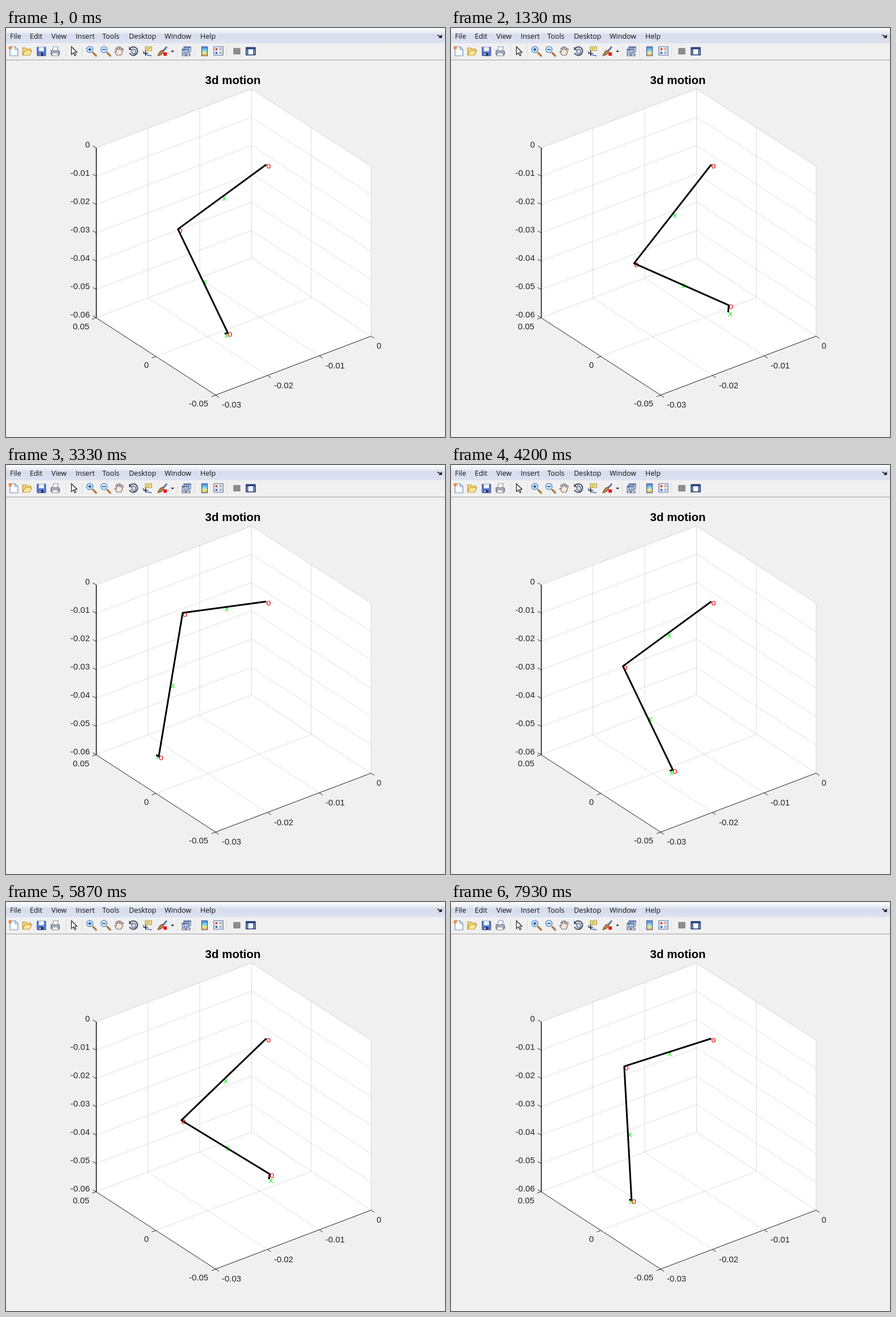
These frames come from a looping animation (775x722 px, 8 s). An HTML page:

```html
<!DOCTYPE html>
<html lang="en">
<head>
<meta charset="utf-8">
<title>3d motion</title>
<style>
  html, body { margin: 0; width: 100%; height: 100%; overflow: hidden; background: #f0f0f0; }
  svg { display: block; }
  .menu { font: 12.5px "Open Sans", sans-serif; fill: #111; }
  .axes text { font: 15px "Liberation Sans", Arial, sans-serif; fill: #262626; }
  .axes .title { font-size: 20.5px; font-weight: bold; fill: #000; }
  .marks { font: 14.5px "Liberation Sans", Arial, sans-serif; }
</style>
</head>
<body>
<svg width="775" height="722" viewBox="0 0 775 722">
  <defs>
    <linearGradient id="bar" x2="0" y2="1">
      <stop offset="0" stop-color="#fdfdfe"/><stop offset=".3" stop-color="#e8ecf5"/>
      <stop offset=".45" stop-color="#d6dcec"/><stop offset="1" stop-color="#dde3f2"/>
    </linearGradient>
    <linearGradient id="rainbow" x2="0" y2="1">
      <stop offset="0" stop-color="#4a78d8"/><stop offset=".4" stop-color="#7fd6e8"/>
      <stop offset=".7" stop-color="#f3ec8a"/><stop offset="1" stop-color="#f0a040"/>
    </linearGradient>
    <g id="lens">
      <path d="M4 4l5 5" stroke="#b5763a" stroke-width="3.4" stroke-linecap="round"/>
      <circle r="5.5" cx="-2" cy="-2" fill="#dff1fc" stroke="#5b93cc" stroke-width="1.5"/>
      <path d="M-5-2h6" stroke="#1c4fa8" stroke-width="1.8"/>
    </g>
  </defs>
  <rect width="775" height="722" fill="#f0f0f0"/>
  <rect width="775" height="27" fill="url(#bar)"/>
  <path d="M0 27.5h775" stroke="#f0f0f0"/>
  <path d="M0 56.5h775" stroke="#a2a2a2"/>
  <path d="M105.500 31v20M134.500 31v20M302.500 31v20M332.500 31v20M389.500 31v20" stroke="#dcdcdc"/>
  <g class="menu" id="menu"></g>
  <path d="M762 12q2 3 5 3" fill="none" stroke="#111" stroke-width="1.6"/>
  <path d="M769.500 11.500v6h-6z" fill="#111"/>

  <g fill="none" stroke-width="1.2">
    <path d="M7 33h9l5 5v11H7z" fill="#fbfdff" stroke="#6c91bd"/>
    <path d="M16 33v5h5" stroke="#6c91bd"/>
    <circle cx="7.500" cy="35" r="3" fill="#f08a3c"/>
    <path d="M29.500 48V35h5l2 2h7v4" fill="#f5d67a" stroke="#bd9133"/>
    <path d="M29.500 48l4-8h12l-4 8z" fill="#ffe89a" stroke="#bd9133"/>
    <path d="M55 34h15v15H56l-1-1z" fill="#5b7fd6" stroke="#3c4f9c"/>
    <path d="M58 34h9v7h-9z" fill="#eef4ff"/><path d="M58 44h8v5h-8z" fill="#2c3768"/>
    <path d="M59 45h2v3h-2z" fill="#fff"/>
    <path d="M82 40l2-7h8l-1 7" fill="#fff" stroke="#8292a8"/>
    <path d="M79.500 40h14l1 2v5h-15z" fill="#aab2bd" stroke="#606978"/>
    <path d="M82 44h9l2 5H81z" fill="#fff" stroke="#7a8390"/>
    <path d="M115.500 33v14l3.500-3 2.500 5 2-1-2.300-5h4.300z" fill="#fff" stroke="#222"/>
    <use href="#lens" x="150" y="40"/><path d="M148 35v6" stroke="#1c4fa8" stroke-width="1.8"/>
    <use href="#lens" x="175" y="40"/>
    <path d="M196 48l-4-6q0-2 3 0l-1-6q1-2 2 0l1 3v-5q2-2 3 0v5l1-5q2-1 2 1v5l2-4q2 0 2 1l-2 7-2 4z" fill="#fce8d4" stroke="#6d6a78"/>
    <path d="M219 36a7.500 7.500 0 1 1-1 8" stroke="#4d5870" stroke-width="2.200"/>
    <path d="M217 33v6h6z" fill="#4d5870"/>
    <path d="M222 39l3-2 4 2v5l-3 2-4-2z" fill="#cfdcf0" stroke="#4d5870"/>
    <path d="M246 33h11v7h-11z" fill="#fff3a0" stroke="#a58b32"/>
    <path d="M248 35.500h7M248 38h5" stroke="#a58b32"/>
    <path d="M242 41q3 7 15 8" stroke="#3f63bd" stroke-width="1.5"/><path d="M242 44.500h9M246.500 40v9" stroke="#111"/>
    <path d="M284 33l-7 8" stroke="#5878ab" stroke-width="3"/>
    <path d="M278 39l-4 1q-4 3-6 9 7-1 10-6z" fill="#b98150" stroke="#7d5431"/>
    <path d="M278 43h6v6h-6z" fill="#f01818"/>
    <path d="M291 40h6l-3 3z" fill="#222"/>
    <path d="M314 33h12v9h-12zM311 37h12v7h-12z" fill="#e6effb" stroke="#4c6999"/>
    <path d="M314 34.500h12M311 38.500h12" stroke="#4c6999" stroke-width="2"/>
    <path d="M311 46h7v3h-7zM317 46h8v3h-8z" stroke="#41597f"/>
    <path d="M345.500 33h10v16h-10z" fill="url(#rainbow)" stroke="#3b568f"/>
    <path d="M367 33h16v15h-16z" fill="#fff" stroke="#45629c"/>
    <path d="M369.500 35.500h4v4h-4z" fill="#e04838"/><path d="M369.500 42h4v4h-4z" fill="#4a6fdc"/>
    <path d="M376 36h5M376 38.500h5M376 42.500h5M376 45h5" stroke="#566"/>
    <path d="M402 36h11v10h-11z" fill="#8d8d8d" stroke="#777"/>
    <path d="M424 34.500h16v13h-16z" fill="#fff" stroke="#1f3768" stroke-width="1.500"/>
    <path d="M424 36h16" stroke="#27437c" stroke-width="3"/>
    <path d="M424 38h3v9h-3zM437 38h3v9h-3z" fill="#7f9cd0" stroke="#27437c"/>
  </g>

  <g class="axes">
    <path d="M159 211.500L433.500 108 644.500 244V544L370 648 159 511.500z" fill="#fff"/>
    <path id="grid" fill="none" stroke="#262626" stroke-opacity=".15"/>
    <path d="M159 511.500L433.500 406 644.500 544M433.500 406V108" fill="none" stroke="#262626" stroke-opacity=".17"/>
    <path id="ticks" d="M159 511.500L370 648 644.500 544" fill="none" stroke="#262626"/>
    <path d="M159.500 211.500v300" stroke="#1a1a1a" stroke-width="1.600"/>
    <text class="title" x="400.500" y="99" text-anchor="middle">3d motion</text>
    <g id="labels" text-anchor="middle"></g>
  </g>
  <g class="marks" id="marks"></g>
  <polyline id="leg" fill="none" stroke="#000" stroke-width="3" stroke-linejoin="round"/>
</svg>
<script>
const $ = id => document.getElementById(id);

function addText(parent, text, x, y, attrs = {}) {
  const el = document.createElementNS("http://www.w3.org/2000/svg", "text");
  el.textContent = text;
  for (const [name, value] of Object.entries({ x, y, ...attrs })) el.setAttribute(name, value);
  return parent.appendChild(el);
}

const MENU = { File: 7, Edit: 42, View: 80, Insert: 123, Tools: 170, Desktop: 217, Window: 280, Help: 343 };
for (const [name, x] of Object.entries(MENU)) addText($("menu"), name, x, 18.5);

// Axes box: u runs along x, v along y, w down the z axis, each from 0 to 1.
const project = (u, v, w) => [370 + 274.5 * u - 211 * v, 348 - 104 * u - 136.500 * v + 300 * w];
const line = (...points) => "M" + points.map(p => project(...p)).join("L");
let grid = "", ticks = $("ticks").getAttribute("d");
const tick = (point, dx, dy) => {
  const [x, y] = project(...point);
  ticks += `M${x} ${y}l${dx} ${dy}`;
};
for (let i = 0; i <= 6; i++) {
  if (i < 6) grid += line([0, 1, i / 6], [1, 1, i / 6], [1, 0, i / 6]);
  tick([0, 1, i / 6], -6, -3.5);
  addText($("labels"), i ? "-0.0" + i : "0", 148, 211 + 50 * i, { "text-anchor": "end" });
}
for (let i = 0; i <= 3; i++) {
  if (i < 3) grid += line([i / 3, 1, 0], [i / 3, 1, 1], [i / 3, 0, 1]);
  tick([i / 3, 0, 1], 6, 4);
}
for (let i = 0; i <= 2; i++) {
  if (i < 2) grid += line([1, i / 2, 0], [1, i / 2, 1], [0, i / 2, 1]);
  tick([0, i / 2, 1], -7, 2.7);
}
$("grid").setAttribute("d", grid);
$("ticks").setAttribute("d", ticks);
for (const [text, x, y] of [["0.05", 132.5, 532], ["0", 248, 600], ["-0.05", 340, 668],
  ["-0.03", 398, 670], ["-0.02", 490, 636], ["-0.01", 581, 601], ["0", 658.5, 566]])
  addText($("labels"), text, x, y);

// One stride, in steps: [step, thigh angle, shank angle] and [step, toe dx, toe dy].
const STRIDE = 63, STEP_MS = 8000 / 120;
const ANGLES = [[0, 7.1, 25.2], [2, 14.6, 31], [7, 34.5, 43.8], [13, 43, 48.8], [15, 41.9, 49.7],
  [20, 29.9, 54], [26, 14.8, 46.8], [28, 9.3, 41], [36, -16.1, 10.3], [39, -19.6, -1],
  [41, -21, -6.5], [46, -22.5, -13.5], [52, -18, -8], [54, -15.5, -2], [56, -12.1, 3.6]];
const FOOT = [[0, -5.5, 2], [7, -4, 8], [15, -2, 12], [20, -1, 12.5], [28, -2, 6],
  [36, -4, -3], [46, -5, -4], [56, -4.5, 0]];

// Smooth periodic curve through the keys.
function sample(keys, step) {
  const n = keys.length;
  const key = (i, c) => keys[(i + n) % n][c] + (c ? 0 : STRIDE * Math.floor(i / n));
  let i = n - 1;
  while (keys[i][0] > step) i--;
  const gap = j => key(j + 1, 0) - key(j, 0);
  const h = gap(i), s = (step - key(i, 0)) / h;
  return [1, 2].map(c => {
    const rate = j => (key(j + 1, c) - key(j, c)) / gap(j);
    const slope = j => (rate(j - 1) * gap(j) + rate(j) * gap(j - 1)) / (gap(j - 1) + gap(j));
    const a = key(i, c), b = key(i + 1, c);
    return a + (b - a) * s * s * (3 - 2 * s)
      + h * s * (1 - s) * (slope(i) * (1 - s) - slope(i + 1) * s);
  });
}

const HIP = [459.5, 241];
const add = ([x, y], dx, dy) => [x + dx, y + dy];
const middle = (a, b) => [(a[0] + b[0]) / 2, (a[1] + b[1]) / 2];

// Each limb turns in a tilted plane, so its end follows an ellipse on screen.
function pose(step) {
  const [thigh, shank] = sample(ANGLES, step).map(a => a * Math.PI / 180);
  const knee = add(HIP, -157.2 * Math.cos(thigh), 91.2 * Math.cos(thigh) + 191.1 * Math.sin(thigh));
  const ankle = add(knee, 206.5 * Math.sin(shank), 241.5 * Math.cos(shank) - 84 * Math.sin(shank));
  return [HIP, knee, ankle, add(ankle, ...sample(FOOT, step))];
}

const marks = [..."oooxxx"].map(c => addText($("marks"), c, 0, 0, { fill: c === "o" ? "#f00" : "#0f0" }));

function draw(now) {
  const step = Math.floor((now % 8000 + 3.5) / STEP_MS) % STRIDE;
  const [hip, knee, ankle, toe] = pose(step);
  $("leg").setAttribute("points", [hip, knee, ankle, toe].join(" "));
  [hip, knee, ankle, middle(hip, knee), middle(knee, ankle), toe].forEach(([x, y], i) => {
    marks[i].setAttribute("x", x);
    marks[i].setAttribute("y", y + 6.7);
  });
}

const start = performance.now();
function loop() {
  draw(performance.now() - start);
  requestAnimationFrame(loop);
}
loop();
</script>
</body>
</html>
```
